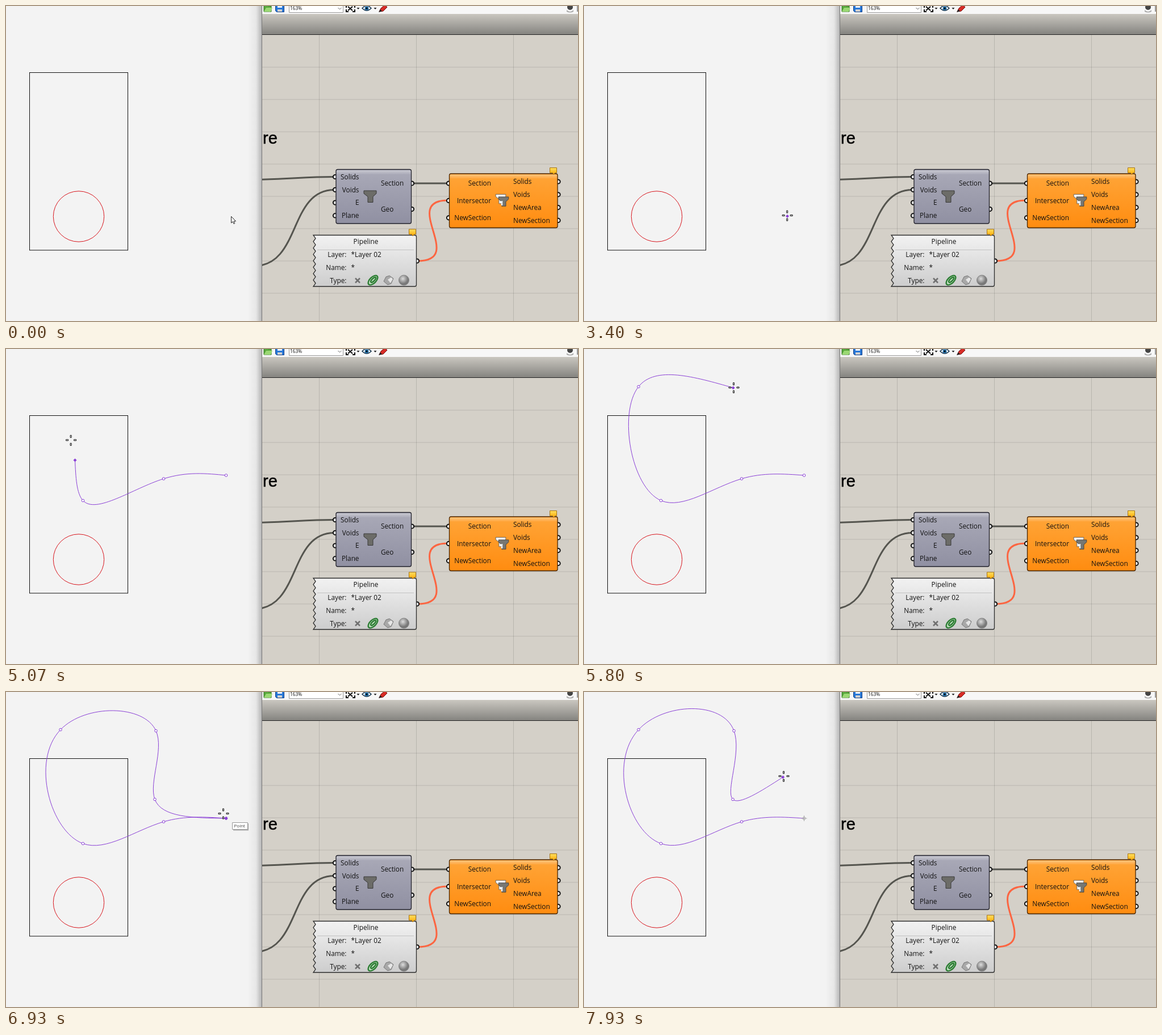
Write an HTML page that moves like this. It is 1007 px wide and 556 px high and loops after 8000 ms.

```html
<!DOCTYPE html>
<html lang="en">
<head>
<meta charset="utf-8">
<title>Drawing a curve beside a node graph</title>
<style>
html, body { margin: 0; width: 100%; height: 100%; overflow: hidden; background: #f3f3f3; }
svg { display: block; width: 1007px; height: 556px; }
text { font: 11.8px "Open Sans", "Noto Sans", sans-serif; fill: #111; white-space: pre; }
.end { text-anchor: end; }
.middle { text-anchor: middle; }
.wire { fill: none; stroke: #55554f; stroke-width: 3; }
.port { fill: #fff; stroke: #111; stroke-width: 2; }
</style>
</head>
<body>
<svg viewBox="0 0 1007 556">
  <defs>
    <linearGradient id="edge"><stop offset="0" stop-opacity="0"/><stop offset=".6" stop-opacity=".05"/><stop offset="1" stop-opacity=".25"/></linearGradient>
    <linearGradient id="band" x2="0" y2="1"><stop stop-color="#cac7c0"/><stop offset="1" stop-color="#858480"/></linearGradient>
    <linearGradient id="violet" x2="0" y2="1"><stop stop-color="#aaaab8"/><stop offset="1" stop-color="#9090a2"/></linearGradient>
    <linearGradient id="orange" x2="0" y2="1"><stop stop-color="#ffa538"/><stop offset="1" stop-color="#ff8c10"/></linearGradient>
    <linearGradient id="silver" x2="0" y2="1"><stop stop-color="#f2f2f2"/><stop offset="1" stop-color="#cdcdcd"/></linearGradient>
    <linearGradient id="gold" x2="0" y2="1"><stop stop-color="#ffe060"/><stop offset="1" stop-color="#ffa800"/></linearGradient>
    <linearGradient id="gloss" x2="0" y2="1"><stop stop-color="#fff" stop-opacity=".35"/><stop offset="1" stop-color="#fff" stop-opacity=".05"/></linearGradient>
    <radialGradient id="ball" cx=".4" cy=".35"><stop stop-color="#ddd"/><stop offset="1" stop-color="#777"/></radialGradient>
    <clipPath id="graphArea"><path d="M451 0H1007V556H451Z"/></clipPath>
    <path id="bubble" d="M-6-5.500H6V3.500H3L.5 6.500-1 3.500H-6Z" fill="url(#gold)" stroke="#a87312"/>
    <path id="tee" d="M-11-9.500H11V-4.500L5 1V11H-4V1L-11-4.500Z"/>
  </defs>

  <rect x="41.500" y="117.500" width="173" height="313.500" fill="none" stroke="#111"/>
  <circle cx="128" cy="371.500" r="44.700" fill="none" stroke="#d8141c"/>

  <g id="drawing" fill="none" stroke="#8a3fd6">
    <path id="curve"/>
    <g id="knots" fill="#fff"></g>
    <path id="anchor" stroke="#aaa" d="M-5 0H5M0-5V5M-2.500 0a2.500 2.500 0 1 1 5 0a2.500 2.500 0 1 1-5 0"/>
    <path id="diamond" d="M0-3 3 0 0 3-3 0Z" fill="#8a3fd6" stroke="none"/>
  </g>

  <rect x="425" width="25" height="556" fill="url(#edge)"/>
  <g id="graph" clip-path="url(#graphArea)">
    <path d="M451 0H1007V556H451Z" fill="#d4d0c8"/>
    <path id="grid" stroke="#000" stroke-opacity=".13"/>
    <path d="M451 0H1007V14H451Z" fill="#f7f7f7"/>
    <path d="M451 14H1007V50H451Z" fill="url(#band)"/>
    <path d="M451 50.500H1007" stroke="#222"/>

    <path d="M454-2h6l2 2h5v10h-13Z" fill="#58a83c" stroke="#2c6b1c"/><path d="M454 10l4-7h11l-3 7Z" fill="#9ad873"/>
    <path d="M474.500-3h15v13.500h-13l-2-2Z" fill="#2878d8" stroke="#123f86"/><path d="M478-3h8v6h-8Z" fill="#e8f2ff"/><path d="M478 6h8v4h-8Z" fill="#d0d0d0"/>
    <path d="M498.500-2H593.500V11.500H498.500Z" fill="#fff" stroke="#999"/>
    <text x="500" y="7" style="font-size:8.400px">163%</text>
    <path d="M584.500 3l3 3 3-3" fill="none" stroke="#666"/>
    <path d="M599 0v3M599 6v4h4M610 10h4v-4M614 3v-4M602 1l8 7M610 1l-8 7" fill="none" stroke="#111" stroke-width="2"/>
    <path d="M617.500 3h5l-2.500 3ZM647.500 3h5l-2.500 3Z" fill="#222"/>
    <path d="M627 4q8-9 16 0q-8 8-16 0Z" fill="#fff" stroke="#18364f" stroke-width="1.500"/><circle cx="635" cy="4" r="3.500" fill="#236ea6"/><circle cx="635" cy="4" r="1.500"/>
    <path d="M657 10l3-6 7-6 4 4-7 7Z" fill="#d92c26" stroke="#6e1010"/><path d="M656 11l3-5 3 3Z" fill="#222"/>
    <circle cx="993" cy="2" r="5" fill="#444"/><path d="M987 7q6 6 12 0v3q-6 3-12 0Z" fill="#aaa"/><path d="M1005 0h2v10h-2Z" fill="#999"/>

    <text x="452" y="243" style="font:29px 'Liberation Sans',Arial,sans-serif;fill:#000;stroke:#000;stroke-width:.5">re</text>

    <path class="wire" d="M430 306.500C500 306 520 301.500 578 301.500M436 459C520 459 497 324.500 578 324.500M716 313H778"/>
    <path class="wire" style="stroke:#fc6541" d="M725 450C810 450 694 343 778 343"/>
    <g id="ports"></g>

    <rect x="581" y="288.500" width="132.500" height="95.500" rx="3" fill="url(#violet)" stroke="#22222c" stroke-width="1.300"/>
    <path d="M582 290h130.500v7H582Z" fill="url(#gloss)"/>
    <use href="#tee" x="641" y="335.500" fill="#6c6c68" stroke="#383838"/>

    <rect x="780.500" y="296" width="190.500" height="95.500" rx="3" fill="url(#orange)" stroke="#4a2500" stroke-width="1.300"/>
    <path d="M781.500 297.500h188.500v7H781.500Z" fill="url(#gloss)"/>
    <use href="#tee" fill="#f4f6f8" stroke="#555" transform="translate(871 340) scale(.8)"/>
    <use href="#tee" fill="#777772" stroke="#333" transform="translate(876 344.500) scale(.8)"/>
    <path d="M873 344v8" stroke="#e8eef2" stroke-width="2.500"/>

    <path id="panel" fill="url(#silver)" stroke="#2c2c2c" stroke-width="1.300"/>
    <path d="M548 430.500H718" stroke="#c2c2c2"/>
    <path d="M615 480.500l8 8m0-8l-8 8" stroke="#707070" stroke-width="2.500"/>
    <g fill="none" stroke="#2b7c32" stroke-width="2.300" transform="translate(646 484) rotate(-45)"><ellipse rx="10.500" ry="5.500" fill="#b9d8ba"/><ellipse cx="1" rx="6" ry="2.300"/></g>
    <path d="M665 486l4-8 6-2 7 5-4 9-6 2Z" fill="#a8a8a8" stroke="#777"/><path d="M672 483l6-4 3 3-4 7Z" fill="#e6e6e6"/>
    <circle cx="700.500" cy="484" r="9" fill="url(#ball)" stroke="#888"/>
    <use href="#bubble" x="715.500" y="399.500"/>
    <use href="#bubble" x="963.500" y="291"/>
  </g>
  <path d="M450.500 0V556" stroke="#777"/>

  <path id="arrow" d="M0 0V11.500L2.600 9.100 4.400 13 6.200 12.200 4.500 8.400H8Z" fill="#fff" stroke="#222"/>
  <path id="cross" d="M-9-1.500h4v2h-4ZM5-1.500h4v2h-4ZM-1.500-9h2v4h-2ZM-1.500 5h2v4h-2Z" fill="#fff" stroke="#111"/>
  <g id="tip">
    <path d="M17 17h27v12.500h-27Z" opacity=".3"/>
    <path d="M15.500 15.500h27v12h-27Z" fill="#fff" stroke="#999"/>
    <text x="18.500" y="24" style="font-size:8px;fill:#444">Point</text>
  </g>
</svg>
<script>
const $ = id => document.getElementById(id);
const add = (parent, tag, attrs, text = '') => {
  const el = document.createElementNS('http://www.w3.org/2000/svg', tag);
  for (const key in attrs) el.setAttribute(key, attrs[key]);
  el.textContent = text;
  return parent.appendChild(el);
};
const show = (el, on) => el.style.display = on ? '' : 'none';
const place = (id, { x, y }) => $(id).setAttribute('transform', `translate(${x} ${y})`);
const distance = (a, b) => Math.hypot(a.x - b.x, a.y - b.y);

// Graph background and the panel with its torn left edge
let grid = '';
for (let x = 551.5; x < 1007; x += 171) grid += `M${x} 14V556`;
for (let y = 108; y < 556; y += 57) grid += `M451 ${y}H1007`;
$('grid').setAttribute('d', grid);

const TEETH = 8, TOOTH = 90.5 / TEETH;
$('panel').setAttribute('d', 'M541 404.500H719.500q3 0 3 3V492q0 3-3 3H541' +
  `l4 ${-TOOTH / 2}l-4 ${-TOOTH / 2}`.repeat(TEETH) + 'Z');

// A column of labels, each row with an optional port at portX
const ROW = 22.8;
function column(words, x, y, anchor, { gap = ROW, portX } = {}) {
  words.split(' / ').forEach((word, i) => {
    const cy = y + i * gap;
    add($('graph'), 'text', { x, y: cy + 4.3, class: anchor }, word);
    if (portX) add($('ports'), 'circle', { class: 'port', cx: portX, cy, r: 3.6 });
  });
}
column('Solids / Voids / E / Plane', 621.5, 301.5, 'end', { portX: 579.5 });
column('Section / Geo', 660, 313, 'start', { gap: 2 * ROW, portX: 714.5 });
column('Section / Intersector / NewSection', 854, 313, 'end', { gap: ROW * 4 / 3, portX: 779.5 });
column('Solids / Voids / NewArea / NewSection', 893, 310, 'start', { portX: 972 });
column('Pipeline', 633.5, 416, 'middle');
column('Layer: / Name: / Type:', 599.5, 439, 'end');
column('*Layer 02 / *', 607.5, 439, 'start');
add($('ports'), 'circle', { class: 'port', cx: 723.5, cy: 450, r: 3.6 });

// Places where the pointer rests; clicked ones become curve points on leaving
const stop = (arrive, leave, x, y, click = false) => ({ arrive, leave, x, y, click });
const stops = [
  stop(0, 0, 397, 371),
  stop(67, 270, 368, 401),
  stop(467, 3399, 358, 371),
  stop(3933, 4067, 387.5, 223, true),
  stop(4400, 4467, 277.5, 229, true),
  stop(4667, 4888, 135.5, 267.5, true),
  stop(5460, 5467, 96, 66.5, true),
  stop(5760, 5933, 264, 68.5, true),
  stop(6533, 6600, 262, 189.5, true),
  stop(6930, 7333, 383, 215),
  stop(7667, 7667, 320, 172),
  stop(7930, 8000, 352, 149)
];
const clicks = stops.filter(s => s.click);
const knots = clicks.map(({ x, y }) => add($('knots'), 'circle', { cx: x, cy: y, r: 2.3 }));
place('anchor', clicks[0]);

function pointer(t) {
  const i = Math.max(1, stops.findIndex(s => s.leave > t));
  const from = stops[i - 1], to = stops[i];
  const left = 1 - Math.min(1, (t - from.leave) / (to.arrive - from.leave));
  const k = 1 - left * left;
  return { x: from.x + (to.x - from.x) * k, y: from.y + (to.y - from.y) * k };
}

// Slopes of a natural cubic spline with knot spacing h
function slopes(values, h) {
  const n = values.length, c = [], r = [];
  for (let i = 0; i < n; i++) {
    const a = i ? 1 / h[i - 1] : 0, b = i < n - 1 ? 1 / h[i] : 0;
    const rhs = 3 * ((i ? (values[i] - values[i - 1]) * a * a : 0) +
      (i < n - 1 ? (values[i + 1] - values[i]) * b * b : 0));
    const pivot = 2 * (a + b) - (i ? a * c[i - 1] : 0);
    c[i] = b / pivot;
    r[i] = (rhs - (i ? a * r[i - 1] : 0)) / pivot;
  }
  for (let i = n - 2; i >= 0; i--) r[i] -= c[i] * r[i + 1];
  return r;
}

function spline(points) {
  if (points.length < 2) return '';
  const h = points.slice(1).map((p, i) => distance(p, points[i]));
  const dx = slopes(points.map(p => p.x), h), dy = slopes(points.map(p => p.y), h);
  return `M${points[0].x} ${points[0].y}` + h.map((len, i) => {
    const p = points[i], q = points[i + 1], k = len / 3;
    return `C${p.x + dx[i] * k} ${p.y + dy[i] * k} ${q.x - dx[i + 1] * k} ${q.y - dy[i + 1] * k} ${q.x} ${q.y}`;
  }).join('');
}

const STEP = 1000 / 15, DRAW_START = 2930, SNAP_END = 7400;
function draw(now) {
  const t = Math.floor((now % 8000 + 4) / STEP) * STEP + .5;
  const cursor = pointer(t);
  const points = clicks.filter(p => p.leave <= t);
  const closing = points.length === clicks.length;
  const snapped = closing && t < SNAP_END && distance(cursor, clicks[0]) < 20;
  const live = snapped ? clicks[0] : pointer(t - STEP);   // the curve trails the pointer by one step
  const drawing = t > DRAW_START;

  show($('arrow'), t < 1999);
  show($('cross'), drawing);
  show($('drawing'), drawing);
  show($('tip'), snapped);
  show($('anchor'), t > SNAP_END);
  for (const id of ['arrow', 'cross', 'tip']) place(id, cursor);
  place('diamond', live);

  knots.forEach((knot, i) => show(knot, i < points.length && (i || t < SNAP_END)));
  if (points.length && distance(live, points[points.length - 1]) > 1) points.push(live);
  $('curve').setAttribute('d', spline(points));
}

const begin = performance.now();
(function frame() {
  draw(performance.now() - begin);
  requestAnimationFrame(frame);
})();
</script>
</body>
</html>
```
